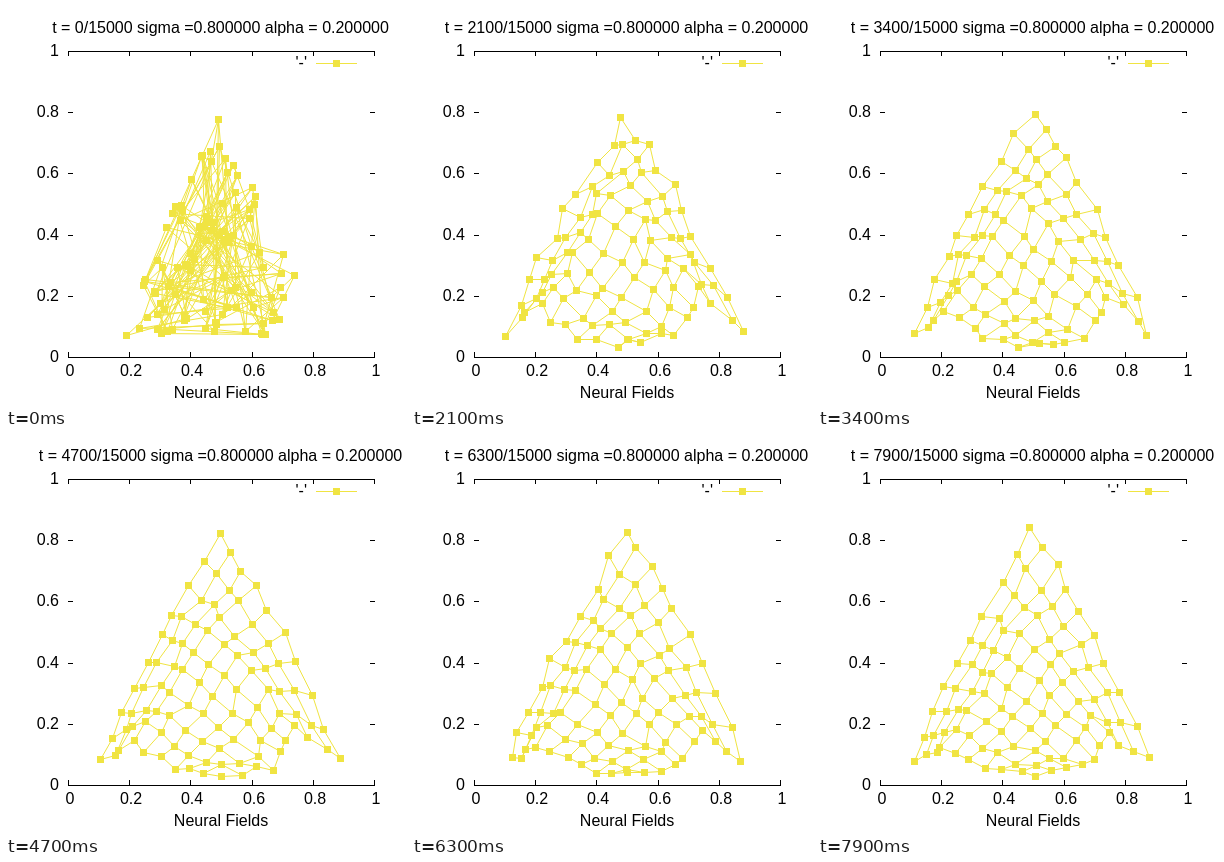
Write an HTML page with a canvas that moves like this. It is 400 px wide and 400 px high and loops after 8000 ms.

```html
<!DOCTYPE html>
<html>
<head>
<meta charset="utf-8">
<title>Neural Fields</title>
<style>
html, body { margin: 0; width: 100%; height: 100%; overflow: hidden; background: #fff; }
canvas { display: block; width: 400px; height: 400px; }
</style>
</head>
<body>
<canvas id="stage" width="400" height="400"></canvas>
<script>
const ctx = document.getElementById('stage').getContext('2d');
const YELLOW = '#f0e442';
const SIZE = 10, STEP = 100, STEPS = 80;
const LEFT = 62, TOP = 45, SPAN = 306, RIGHT = LEFT + SPAN, BOTTOM = TOP + SPAN;

function rng(seed) {
  let s = seed >>> 0;
  return () => {
    s = (s + 0x6d2b79f5) >>> 0;
    let r = Math.imul(s ^ (s >>> 15), s | 1);
    r ^= r + Math.imul(r ^ (r >>> 7), r | 61);
    return ((r ^ (r >>> 14)) >>> 0) / 4294967296;
  };
}

// Untrained net: random mixes of three triangle corners, dense in the middle.
const rand = rng(27);
const start = Array.from({ length: SIZE * SIZE }, () => {
  const a = rand() ** 1.4, b = rand() ** 1.4, c = rand() ** 1.4, sum = a + b + c;
  return {
    x: (0.17 * a + 0.83 * b + 0.48 * c) / sum,
    y: (0.06 * a + 0.08 * b + 0.82 * c) / sum,
    rate: 0.14 + 0.1 * rand()
  };
});

// The net's four sides; the two arches beside the base flatten with training.
function sidesAt(n) {
  const loose = Math.exp(-n / 35);
  const apex = [0.495, 0.85 - 0.1 * loose], base = [0.505, 0.035];
  const right = [0.88, 0.08], left = [0.115, 0.08];
  return {
    topRight: [apex, [0.61, 0.65], [0.74, 0.405], right],
    topLeft: [apex, [0.34, 0.56], [0.215, 0.325], left],
    baseRight: [right, [0.744, 0.15 + 0.14 * loose], [0.665, 0.06], base],
    baseLeft: [left, [0.205, 0.12 + 0.08 * loose], [0.345, 0.058], base]
  };
}

const lerp = (a, b, t) => a + (b - a) * t;

function along(side, axis, t) {
  const k = Math.min(2, Math.floor(t * 3));
  return lerp(side[k][axis], side[k + 1][axis], t * 3 - k);
}

// Coons patch: the inside of the net follows from its four sides.
function patch(s, axis, u, v) {
  const across = lerp(along(s.topRight, axis, u), along(s.baseLeft, axis, u), v);
  const down = lerp(along(s.topLeft, axis, v), along(s.baseRight, axis, v), u);
  const upper = lerp(s.topRight[0][axis], s.topRight[3][axis], u);
  const lower = lerp(s.baseLeft[0][axis], s.baseLeft[3][axis], u);
  return across + down - lerp(upper, lower, v);
}

function netAt(n) {
  const sides = sidesAt(n), noise = rng(n * 7919 + 5);
  const shake = 0.024 + 0.06 * Math.exp(-n / 12);
  return start.map((p, i) => {
    const u = (i % SIZE) / (SIZE - 1), v = Math.floor(i / SIZE) / (SIZE - 1);
    const w = Math.exp(-n * p.rate);
    const place = axis => patch(sides, axis, u, v) + shake * (noise() - 0.5);
    const x = lerp(place(0), p.x, w), y = lerp(place(1), p.y, w);
    return [Math.round(LEFT + SPAN * x) + 0.5, Math.round(BOTTOM - SPAN * y) + 0.5];
  });
}

function line(points) {
  ctx.beginPath();
  points.forEach(([x, y]) => ctx.lineTo(x, y));
  ctx.stroke();
}

function dot([x, y]) {
  ctx.fillRect(x - 3.5, y - 3.5, 7, 7);
}

function text(str, x, y, align) {
  ctx.textAlign = align;
  ctx.fillText(str, x, y);
}

function drawAxes(n) {
  ctx.fillStyle = ctx.strokeStyle = '#000';
  ctx.font = '16px "Liberation Sans", Arial, sans-serif';
  text(`t = ${n * 100}/15000 sigma =0.800000 alpha = 0.200000`, 214.5, 27, 'center');
  text('Neural Fields', 215, 392, 'center');
  text("'-'", 301, 62, 'right');
  for (const y of [TOP, BOTTOM]) line([[LEFT, y + 0.5], [RIGHT + 1, y + 0.5]]);
  for (let k = 0; k <= 5; k++) {
    const label = String(k / 5), d = Math.round(k * SPAN / 5);
    const x = LEFT + d + 0.5, y = BOTTOM - d + 0.5;
    text(label, 53, y + 4.5, 'right');
    text(label, x + 1.5, 370, 'center');
    line([[x, BOTTOM], [x, BOTTOM - 5]]);
    line([[x, TOP], [x, TOP + 5]]);
    line([[LEFT, y], [LEFT + 5, y]]);
    line([[RIGHT + 1, y], [RIGHT - 4, y]]);
  }
}

function drawNet(n) {
  const net = netAt(n);
  ctx.fillStyle = ctx.strokeStyle = YELLOW;
  for (let k = 0; k < SIZE; k++) {
    line(net.slice(k * SIZE, (k + 1) * SIZE));
    line(net.filter((_, i) => i % SIZE === k));
  }
  net.forEach(dot);
  line([[310, 57.5], [351, 57.5]]);
  dot([330.5, 57.5]);
}

function draw(now) {
  const n = Math.floor(now / STEP) % STEPS;
  ctx.fillStyle = '#fff';
  ctx.fillRect(0, 0, 400, 400);
  ctx.lineWidth = 1;
  drawAxes(n);
  drawNet(n);
}

const begin = performance.now();
function tick() {
  draw(performance.now() - begin);
  requestAnimationFrame(tick);
}
tick();
</script>
</body>
</html>
```
